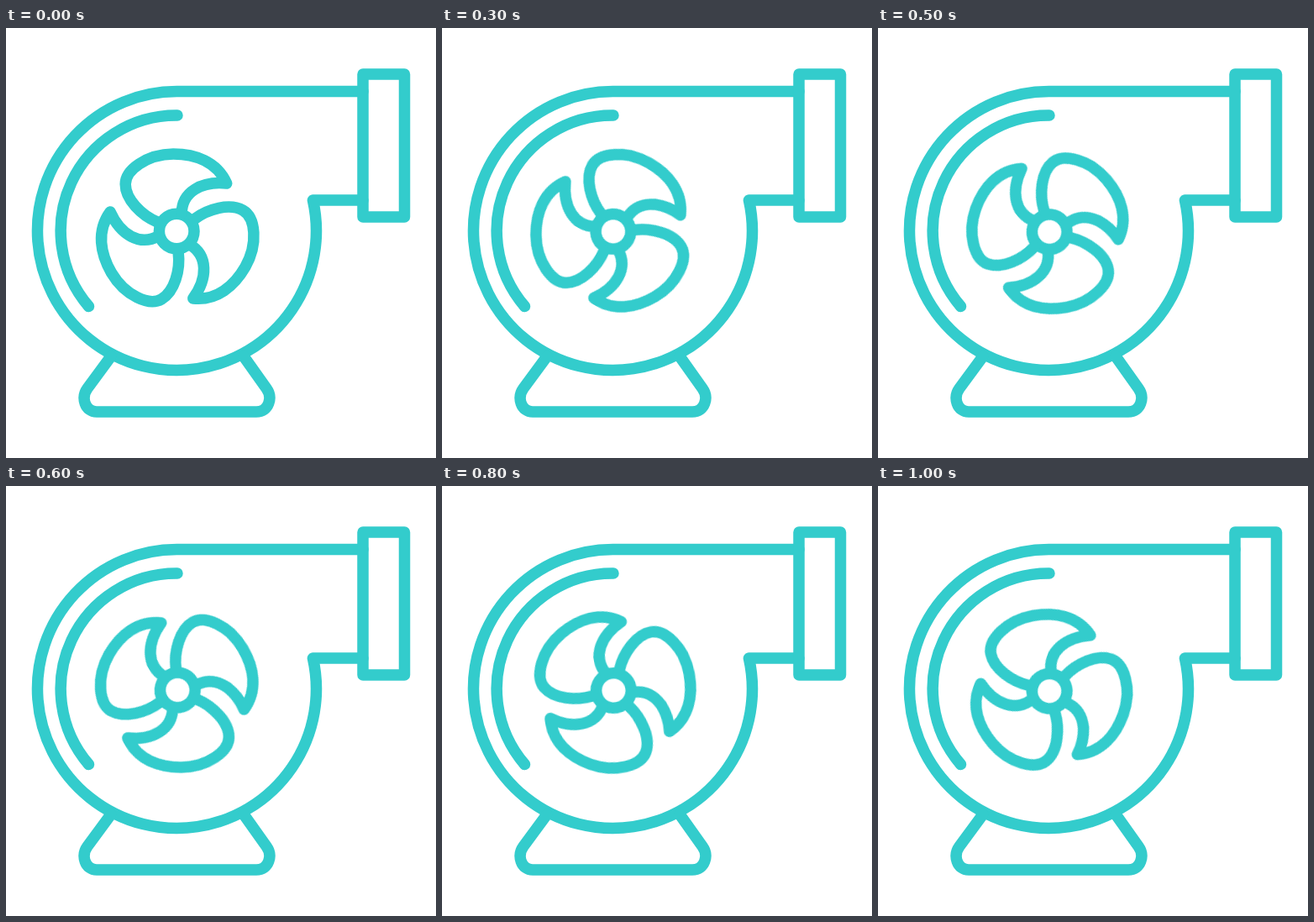
Animation, 512 px wide and 512 px high, one loop 1100 ms. Source, as an HTML page:

```html
<!DOCTYPE html>
<html lang="en">
<head>
<meta charset="utf-8">
<title>Blower</title>
<style>
  html, body {
    margin: 0;
    width: 100%;
    height: 100%;
    overflow: hidden;
    background: #fff;
  }
  svg {
    display: block;
    width: 100vw;
    height: 100vh;
    fill: none;
    stroke: #33cccc;
    stroke-width: 13.5;
    stroke-linecap: round;
    stroke-linejoin: round;
  }
  /* The pivot sits slightly off the hub, so the fan wobbles. */
  .fan {
    transform-origin: 202.9px 243.5px;
    animation: spin 1100ms infinite;
  }
  /* Ten-degree ticks, with one double tick before the loop closes. */
  @keyframes spin {
    0% { transform: rotate(0deg); animation-timing-function: steps(10, end); }
    90.9% { transform: rotate(100deg); animation-timing-function: step-end; }
    90.909% { transform: rotate(110deg); animation-timing-function: step-end; }
    100% { transform: rotate(120deg); }
  }
</style>
</head>
<body>
<svg viewBox="0 0 512 512">
  <defs>
    <path id="blade" d="M-23 -11 C-42 -19 -61 -38 -61 -56 C-61 -73 -36 -91.5 -4 -92 C22 -92 48 -83 59.5 -57 C30 -60 6 -47 6 -21"/>
  </defs>

  <!-- housing -->
  <path d="M425 75.5 H203.5 A166 166 0 1 0 365.4 205 H425"/>
  <path d="M204 104 A137.7 137.7 0 0 0 98.5 331.5"/>
  <rect x="425" y="55" width="49.5" height="170"/>

  <!-- stand -->
  <path d="M125 391 L97 429 C89 440 94 457 108 457 H298 C313 457 318 440 310 429 L283 391"/>

  <g class="fan">
    <g transform="translate(203.2 242)">
      <circle r="20.8"/>
      <use href="#blade"/>
      <use href="#blade" transform="rotate(120)"/>
      <use href="#blade" transform="rotate(240)"/>
    </g>
  </g>
</svg>
</body>
</html>
```
